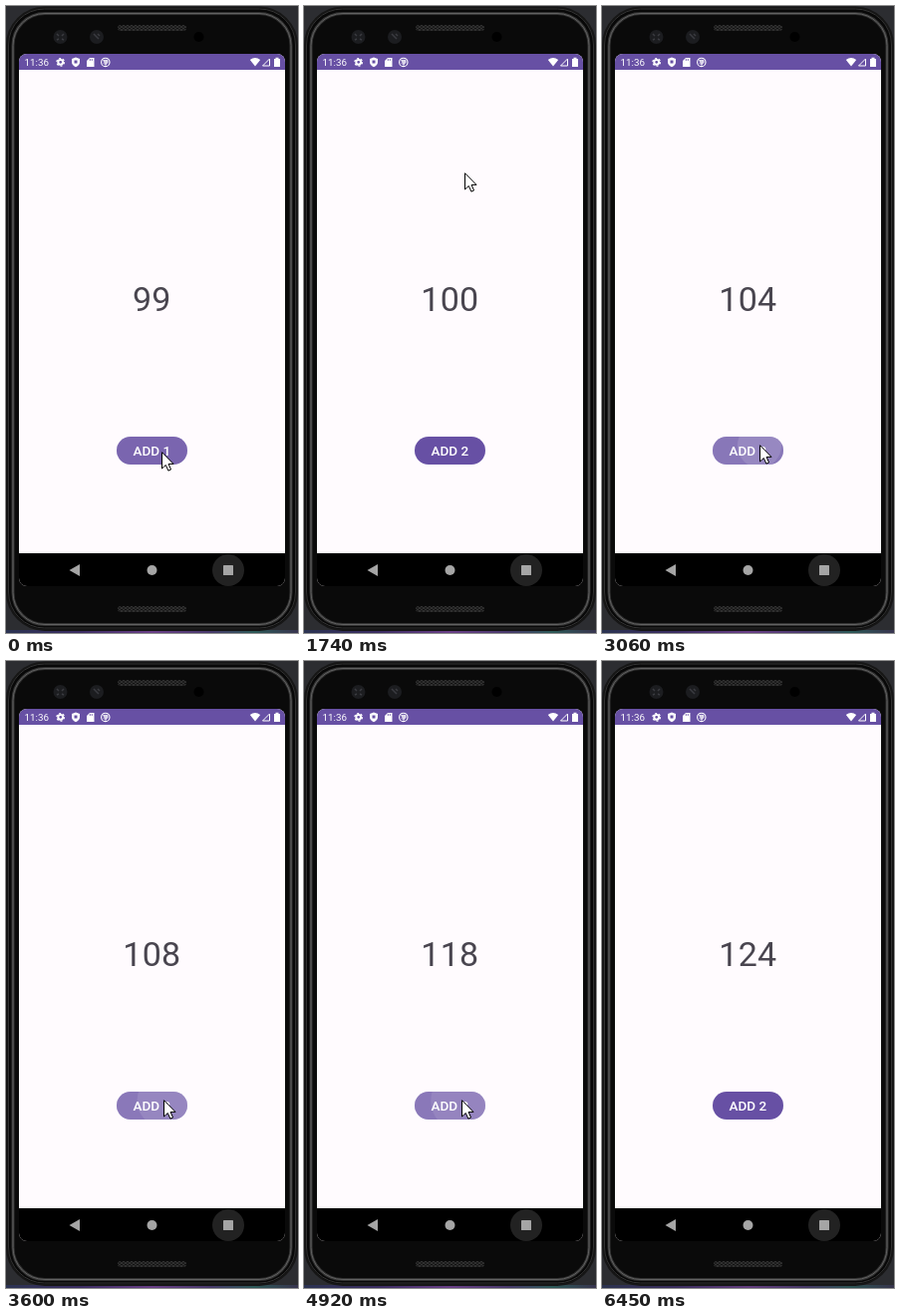
Animation, 293 px wide and 629 px high, one loop 7.12 s. Source, as an HTML page:

```html
<!DOCTYPE html>
<html lang="en">
<head>
<meta charset="utf-8">
<title>Counter app</title>
<style>
  html, body { margin: 0; width: 100%; height: 100%; overflow: hidden; background: #2c2d31; }
  svg { display: block; width: 293px; height: 629px; }
  text { font-family: Roboto, sans-serif; fill: #fff; }
  .label { font-weight: 500; text-anchor: middle; }
  #count { font-size: 34px; letter-spacing: .2px; fill: #49454f; text-anchor: middle; }
</style>
</head>
<body>
<svg viewBox="0 0 293 629">
  <defs>
    <linearGradient id="desk">
      <stop offset="0" stop-color="#2b3352"/>
      <stop offset=".25" stop-color="#3b2d63"/>
      <stop offset=".5" stop-color="#6a3f88"/>
      <stop offset=".7" stop-color="#48396c"/>
      <stop offset=".85" stop-color="#2c5a58"/>
      <stop offset="1" stop-color="#38344f"/>
    </linearGradient>
    <pattern id="mesh" width="4" height="3" patternUnits="userSpaceOnUse">
      <path d="M0 0L4 3M0 3L4 0" stroke="#3c3c3c" stroke-width=".8"/>
    </pattern>
    <clipPath id="screen"><rect x="13" y="48" width="267" height="534" rx="8"/></clipPath>
    <clipPath id="addShape"><rect x="111" y="432" width="71" height="28" rx="14"/></clipPath>
    <clipPath id="upShape"><rect x="93" y="153" width="107" height="28" rx="14"/></clipPath>
  </defs>

  <!-- Desktop and phone body -->
  <rect width="293" height="629" fill="#2c2d31"/>
  <rect id="strip" y="626" width="293" height="3" fill="url(#desk)"/>
  <rect x="1" y="1.5" width="291" height="624.5" rx="38" fill="#080808" stroke="#161616" stroke-width="2"/>
  <rect x="2.5" y="3" width="288" height="621" rx="36" fill="none" stroke="#333"/>
  <rect x="7" y="7.5" width="279" height="613" rx="32" fill="#0a0a0a" stroke="#333" stroke-width="3"/>
  <rect x="7" y="7.5" width="279" height="613" rx="32" fill="none" stroke="#626262"/>
  <g id="speaker">
    <rect x="112" y="19" width="69" height="6" rx="3" fill="#111"/>
    <rect x="112" y="19" width="69" height="6" rx="3" fill="url(#mesh)"/>
  </g>
  <use href="#speaker" y="583"/>
  <g fill="#1c1d20">
    <circle cx="54.5" cy="31" r="7"/><circle cx="91" cy="31" r="7"/>
    <circle cx="193.5" cy="31" r="5" fill="#000"/>
  </g>
  <g fill="none" stroke="#3a3b40" stroke-width="1.5">
    <path d="M51 28l2 2M58 28l-2 2M51 34l2-1M58 34l-2-1"/>
    <path d="M88 28l5 5M92 28l2 2"/>
  </g>

  <!-- Screen -->
  <g clip-path="url(#screen)">
    <rect x="13" y="48" width="267" height="534" fill="#fffbfe"/>
    <rect x="13" y="48" width="267" height="16" fill="#6750a4"/>
    <rect x="13" y="549" width="267" height="33"/>
  </g>
  <text x="18.5" y="60" font-size="9.8">11:36</text>
  <g fill="#fff">
    <circle cx="54.7" cy="56.3" r="2.4" fill="none" stroke="#fff" stroke-width="2"/>
    <circle cx="54.7" cy="56.3" r="3.8" fill="none" stroke="#fff" stroke-width="1.2" stroke-dasharray="2 1.98"/>
    <path d="M70 51.5l4 1.6v3q0 3.5-4 5.2q-4-1.7-4-5.2v-3z"/>
    <path d="M68.5 54.5h3v3h-3z" fill="#6750a4"/>
    <path d="M84 52h4.5v9H81v-6z"/>
    <path d="M84.3 53v2M86.3 53v2" stroke="#6750a4" stroke-width=".8"/>
    <circle cx="99.8" cy="56.4" r="4.2" fill="none" stroke="#fff" stroke-width="1.1"/>
    <path d="M97.5 54.3h4.5v2.5l-2 2.2zM97.5 57l3 3" stroke="#fff" stroke-width=".6" fill-opacity=".75"/>
    <path d="M244.8 54q5.2-4 10.4 0l-5.2 6.5z"/>
    <path d="M257.5 60h7v-7z" fill="none" stroke="#fff"/>
    <path d="M269 53h1.5v-1.3h3v1.3h1.5v8h-6z"/>
  </g>
  <circle cx="223" cy="566" r="16" fill="#222"/>
  <g fill="#a5a5a5">
    <path d="M63.500 566L74 560v12z"/>
    <circle cx="146.500" cy="566" r="5"/>
    <rect x="218" y="561" width="10" height="10" rx=".6"/>
  </g>

  <text id="count" x="146.3" y="306"></text>
  <g id="upgrade">
    <g clip-path="url(#upShape)">
      <rect x="93" y="153" width="107" height="28" fill="#6750a4"/>
      <circle id="upRipple" cx="161" cy="167" r="33" fill="#fff"/>
    </g>
    <text class="label" x="146.5" y="170.7" font-size="9.6">Upgrade to Add 2</text>
  </g>
  <g clip-path="url(#addShape)">
    <rect x="111" y="432" width="71" height="28" fill="#6750a4"/>
    <rect id="tint" x="111" y="432" width="71" height="28" fill="#fff"/>
    <circle id="ripple" cx="158" cy="441" fill="#fff"/>
  </g>
  <text id="add" class="label" x="146.4" y="451.4" font-size="13.5"></text>
  <path id="cursor" d="M.5 .7V17L4.300 13.500L6.900 19.200L9.500 18L7.100 12.400H12Z"
        fill="#fff" stroke="#000"/>
</svg>
<script>
const LOOP = 7120;
const UNLOCK = 120, UPGRADE_PRESS = 1590, UPGRADED = 1740, HIDDEN = 6180;
const FIRST_CLICK = 2698, CLICK_GAP = 260, CLICKS = 12;
const HOLD = 135, HOLD_START = 75;   // the pointer moves in steps of this length

// Pointer tip: [time, x, y]
const path = [
  [240, 156, 447], [480, 200, 330], [750, 171, 157], [1020, 163, 151],
  [1425, 161, 167], [1695, 161, 167], [1965, 206, 395], [2235, 164, 467],
  [2505, 158, 440], [5610, 158, 440], [5880, 268, 584], [6150, 286, 638]
];

const $ = id => document.getElementById(id);
const set = (id, name, value) => $(id).setAttribute(name, value);
const show = (id, on) => set(id, "visibility", on ? "visible" : "hidden");
const clamp = (v, low, high) => Math.min(high, Math.max(low, v));

function pointerAt(t) {
  const held = Math.floor((t - HOLD_START) / HOLD) * HOLD + HOLD_START;
  const next = path.findIndex(key => key[0] > held);
  if (next === 0) return path[0].slice(1);
  if (next < 0) return path.at(-1).slice(1);
  const [t0, x0, y0] = path[next - 1], [t1, x1, y1] = path[next];
  const k = (held - t0) / (t1 - t0);
  return [x0 + (x1 - x0) * k, y0 + (y1 - y0) * k];
}

function draw(t) {
  const beat = (t - FIRST_CLICK) / CLICK_GAP;
  const clicks = clamp(Math.floor(beat) + 1, 0, CLICKS);
  const clicking = beat >= 0 && beat < CLICKS;
  const phase = clicking ? beat % 1 : 0;

  $("count").textContent = t < UNLOCK ? 99 : 100 + 2 * clicks;
  $("add").textContent = t < UPGRADED ? "ADD 1" : "ADD 2";
  show("upgrade", t >= UNLOCK && t < UPGRADED);
  set("upRipple", "opacity", t >= UPGRADE_PRESS ? .14 : 0);

  const fading = Math.max(0, .12 * (1 - t / 480));
  set("tint", "opacity", clicking ? .04 + .19 * Math.sin(Math.PI * phase) : fading);
  set("ripple", "r", 56 * phase);
  set("ripple", "opacity", .2 * (1 - phase));

  set("cursor", "transform", `translate(${pointerAt(t).map(Math.round).join(" ")})`);
  show("cursor", t < HIDDEN);
  set("strip", "opacity", t < 6450 ? 1 : .9);
}

const start = performance.now();
function tick() {
  draw((performance.now() - start) % LOOP);
  requestAnimationFrame(tick);
}
tick();
</script>
</body>
</html>
```
